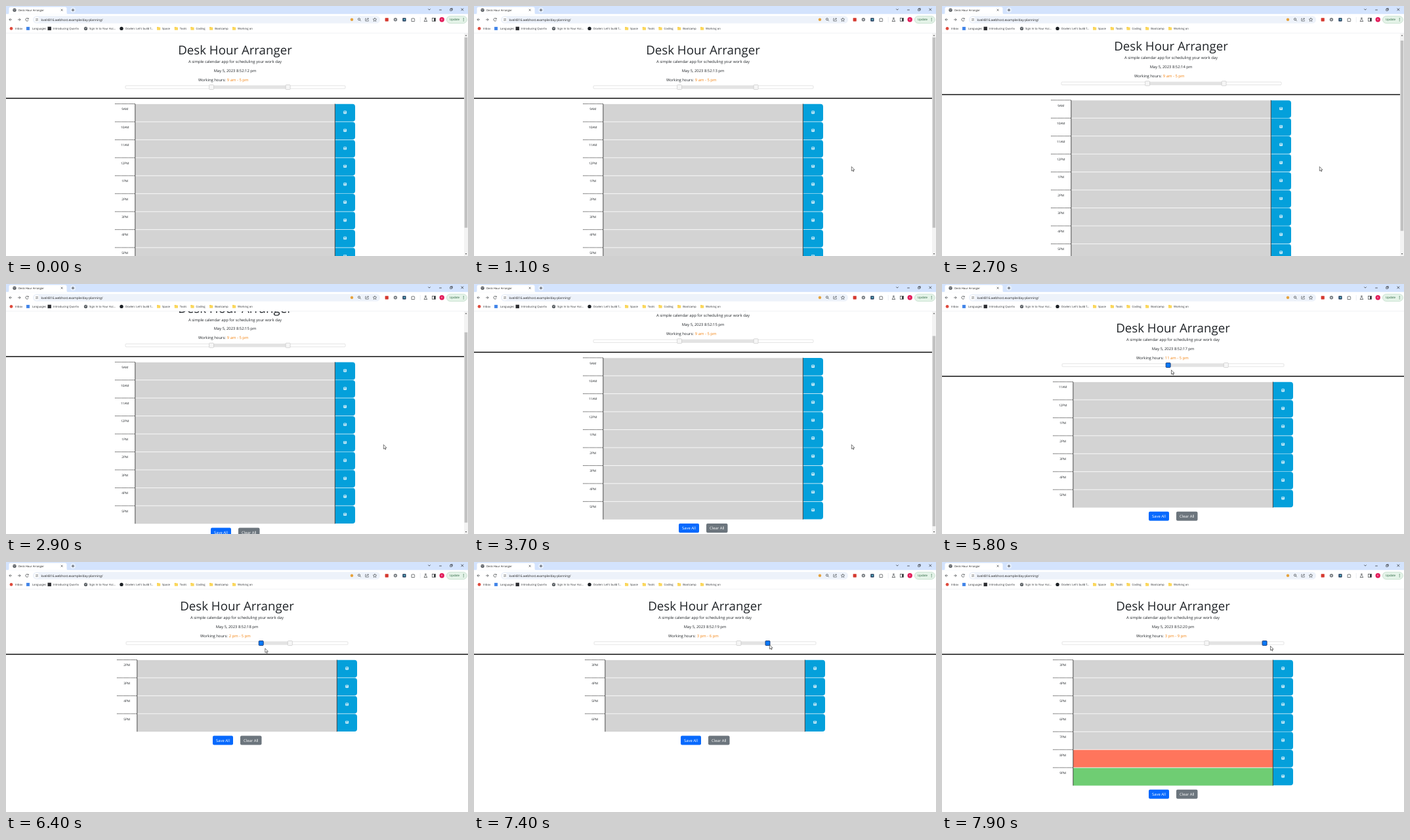
An HTML page that plays this animation: 704 by 382 pixels, repeating every 8 s.

```html
<!DOCTYPE html>
<html lang="en">
<head>
<meta charset="utf-8">
<title>Desk Hour Arranger</title>
<style>
  html, body { margin: 0; width: 100%; height: 100%; overflow: hidden; background: #fff; }
  svg { display: block; width: 100vw; height: 100vh; }
  text { font-family: "Open Sans", "Noto Sans", sans-serif; text-rendering: geometricPrecision; white-space: pre; }
</style>
</head>
<body>
<svg viewBox="0 0 704 382">
  <defs><clipPath id="view"><rect y="41.5" width="704" height="341"/></clipPath></defs>
  <g clip-path="url(#view)"><g id="page"></g></g>
  <g id="scrollbar"></g>
  <g id="browser"></g>
  <path id="cursor" d="M0 0V6.6L1.6 5.2L2.6 7.5L3.6 7L2.6 4.8H4.6Z" fill="#fff" stroke="#222" stroke-width=".6"/>
</svg>
<script>
const $ = id => document.getElementById(id);
const INK = '#212529', UI = '#3c4043';
const TITLE = 'Desk Hour Arranger';
const LOOP = 8000, STEP = 100, MAX_SCROLL = 42.4;

const rect = (x, y, w, h, fill, more = '') =>
  `<rect x="${x}" y="${y}" width="${w}" height="${h}" fill="${fill}" ${more}/>`;
const circle = (x, y, r, fill, more = '') =>
  `<circle cx="${x}" cy="${y}" r="${r}" fill="${fill}" ${more}/>`;
const line = (d, stroke = UI, width = .7, more = '') =>
  `<path d="${d}" fill="none" stroke="${stroke}" stroke-width="${width}" ${more}/>`;
const text = (x, y, str, size, fill = INK, anchor = 'start') =>
  `<text x="${x}" y="${y}" font-size="${size}" fill="${fill}" text-anchor="${anchor}">${str}</text>`;
const move = (id, x, y) => $(id).setAttribute('transform', `matrix(1 0 0 1 ${x} ${y})`);
const globe = (x, y) => circle(x, y, 2.6, '#50555a') +
  line(`M${x - 1.7} ${y - .8}l1.5 .6l.2 1.4M${x + .4} ${y - 1.7}l1.2 1.6`, '#fff', .6);
const folder = (x, y) =>
  rect(x - 2.6, y - 2.4, 2.6, 2, '#f5c842') + rect(x - 2.6, y - 1.8, 5.2, 4.2, '#fbd75b', 'rx=".5"');

function browser() {
  const tabs = rect(0, 0, 704, 12.5, '#d3e3fd') +
    '<path d="M2 12.5Q4.5 12.5 4.5 10V4Q4.5 1.5 7 1.5H90Q92.5 1.5 92.5 4V10Q92.5 12.5 95 12.5Z" fill="#fff"/>' +
    globe(13, 6.2) + text(19, 7.8, TITLE, 4.2, '#1f1f1f') +
    line('M83.7 4.8l2.8 2.8m0-2.8l-2.8 2.8') +
    circle(102, 6.2, 4.4, '#e3edfd') + line('M99.8 6.2h4.4M102 4v4.4', '#222') +
    line('M643.3 4.4l1.7 1.7l1.7-1.7M660.2 6h3.6M693.5 3.6l3.6 3.6m0-3.6l-3.6 3.6', '#222') +
    line('M676.7 4.6h2.6v2.6h-2.6zM677.7 4.6v-1h2.6v2.6h-1', '#222', .6);

  const toolbar = rect(0, 12.5, 704, 29, '#fff') +
    line('M9 20.8H5M6.9 18.8l-2 2l2 2M18 20.8h4M20.1 18.8l2 2l-2 2') +
    line('M33.9 19.6A2.2 2.2 0 1 0 34.1 21.6M34.2 18.2v1.7h-1.7') +
    rect(41, 15.2, 529, 11.4, '#edf2fa', 'rx="5.7"') +
    circle(47, 20.9, 3.8, '#fff') +
    line('M45 19.8h2.2M48.4 19.8h.8M45 22h.8M47 22h2.2', UI, .6) +
    circle(47.8, 19.8, .6, UI) + circle(46.3, 22, .6, UI) +
    text(53.5, 22.7, 'kvel4816.webhost.example/day-planning/', 4.85, '#1f1f1f') +
    circle(527, 20.8, 2.2, '#e6a23c') +
    circle(538, 20.2, 1.6, 'none', `stroke="${UI}" stroke-width=".7"`) + line('M539.2 21.4l1.6 1.7') +
    line('M549 19h-1.2v4h4.6v-1.4M549.3 21.6q.3-2.2 2.8-2.2M551 18l1.6 1.4l-1.6 1.4', UI, .6) +
    line('M562 18l.8 1.9l2 .2l-1.5 1.3l.5 2l-1.8-1l-1.8 1l.5-2l-1.5-1.3l2-.2z', UI, .6) +
    rect(577.6, 18.2, 5.2, 5.2, '#d5392f', 'rx=".6"') +
    circle(593.4, 20.8, 2.7, '#777c80') + circle(593.4, 20.8, 1.1, '#d8dadd') +
    rect(604.3, 18.2, 5.2, 5.2, '#213a5c', 'rx=".6"') + circle(607, 20.8, 1.3, '#5bb9c8') +
    line('M618 19.2h1.5q.4-1.6 1.4 0h1.4v1.5q1.6.5 0 1.5v1.4H618z') +
    line('M631.2 17v8', '#d4dbe6', .5) +
    line('M638.3 18.2h2.2M638.8 18.2v2l-1.7 3.3h4.6l-1.7-3.3v-2', UI, .7) +
    rect(649.6, 18.6, 4.8, 4.6, 'none', `stroke="${UI}" stroke-width=".7"`) + rect(652, 18.6, 2.4, 4.6, UI) +
    circle(664.2, 20.8, 3.7, '#e21b5a') + text(664.2, 22.2, 'K', 3.8, '#fff', 'middle') +
    rect(671.4, 15.4, 31, 11, '#e4f3e8', 'rx="5.5" stroke="#a9cdb4" stroke-width=".5"') +
    text(676, 22.4, 'Update', 4.4, '#1d5b35') +
    [18.9, 20.8, 22.7].map(y => circle(697.2, y, .55, '#1d5b35')).join('');

  const marks = [
    [8, 14, 'Inbox', (x, y) => circle(x, y, 2.4, '#de4a3c')],
    [33.5, 39.8, 'Languages', (x, y) => rect(x - 2.5, y - 2.5, 5, 5, '#4285e8')],
    [66.2, 72, 'Introducing Quorlix', (x, y) => rect(x - 2.7, y - 2.7, 5.4, 5.4, '#2b2c30')],
    [121.5, 127, 'Sign In to Your Acc...', globe],
    [176, 182, "Dovlen: Let's build f...", (x, y) => circle(x, y, 2.7, '#1b1f23')],
    [232.6, 238, 'Space', folder], [259.4, 264.8, 'Tools', folder],
    [284, 289.6, 'Coding', folder], [312.7, 318.2, 'Bootcamp', folder],
    [347.6, 353, 'Working on', folder]
  ].map(([x, tx, label, icon]) => icon(x, 34.4) + text(tx, 36, label, 4.3, '#2b2d30')).join('');

  return tabs + toolbar + marks + line('M0 41.4H704', '#e1e5ea', .5);
}

const clockHour = h => `${h % 12 || 12} ${h < 12 ? 'am' : 'pm'}`;
const slotColor = h => h < 20 ? '#d3d3d3' : h === 20 ? '#ff755c' : '#6fcd73';

function handle(x, active) {
  const [fill, stroke] = active ? ['#0a78f5', '#0a2a66'] : ['#f6f6f6', '#c0c0c0'];
  return rect(x - 3.5, 120.5, 7, 7, fill, `rx="1" stroke="${stroke}" stroke-width="${active ? .8 : .6}"`);
}

function slot(x, y, hour) {
  const label = `${hour % 12 || 12}${hour < 12 ? 'AM' : 'PM'}`;
  const ix = x + 350.6, iy = y + 13;
  return rect(x + 31, y, 304.5, 27.45, slotColor(hour)) +
    line(`M${x + 31} ${y}h304`, '#fff', .8) +
    line(`M${x} ${y}h31`, '#111', .7, 'stroke-dasharray="1.5 .7"') +
    text(x + 15.2, y + 9.8, label, 4.75, INK, 'middle') +
    `<path d="M${x + 335.5} ${y + .3}h26.5q4 0 4 4v18.8q0 4-4 4h-26.5z" fill="#04a0db"/>` +
    rect(ix - 2.2, iy - 2.2, 4.4, 4.4, '#fff', 'rx=".7"') +
    rect(ix - 1.4, iy - 1.5, 2.6, 1.2, '#04a0db') + circle(ix, iy + .9, .7, '#04a0db');
}

function button(x, y, w, label, fill) {
  return rect(x, y, w, 14, fill, 'rx="2"') + text(x + w / 2, y + 9.1, label, 5.9, '#fff', 'middle');
}

function page({ from, to, active, second, barred }) {
  const cx = barred ? 349 : 352, width = cx * 2;
  const left = barred ? 182 : 183, span = barred ? 335 : 338;
  const at = h => left + h * span / 23;
  const x = cx - 183, top = 149.5;
  const bottom = top + (to - from + 1) * 27.45;
  let out = text(cx, 73.8, TITLE, 18.7, INK, 'middle') +
    text(cx, 87, 'A simple calendar app for scheduling your work day', 5.9, INK, 'middle') +
    text(cx, 100.7, `May 5, 2023 8:52:${second} pm`, 5.87, INK, 'middle') +
    text(cx - 56, 114.6, 'Working hours:', 5.9) +
    text(cx - 12.2, 114.6, `${clockHour(from)} - ${clockHour(to)}`, 5.9, '#f3820f') +
    rect(left, 121.8, span, 4.4, '#fff', 'rx="1" stroke="#c9c9c9" stroke-width=".5"') +
    rect(at(from), 121.8, at(to) - at(from), 4.4, '#e3e3e3') +
    handle(at(from), active === 'from') + handle(at(to), active === 'to') +
    rect(0, 140.3, width, 1.5, '#111');
  for (let h = from; h <= to; h++) out += slot(x, top + (h - from) * 27.45, h);
  out += line(`M${x + 30.8} ${top}V${bottom}M${x + 335.3} ${top}V${bottom}`, '#222', .8);
  return out + button(cx - 37, bottom + 6.2, 31, 'Save All', '#0769fd') +
    button(cx + 5, bottom + 6.2, 32.5, 'Clear All', '#6c757d');
}

function scrollbar(overflow, top) {
  const thumb = 327 * 340 / (340 + overflow);
  const y = 48 + (327 - thumb) * top / overflow;
  return rect(698, 41.5, 6, 340.5, '#f3f3f3') + rect(698.7, y, 4.5, thumb, '#c1c1c1') +
    '<path d="M699.6 45.8h2.8l-1.4-1.8zM699.6 378h2.8l-1.4 1.8z" fill="#555"/>';
}

// Pointer path: time, x, y
const path = [
  [700, 690, 365], [1100, 575.3, 245.5], [4000, 575.3, 245.5], [4100, 573.5, 243.5],
  [4400, 352, 147], [4500, 345, 143], [4900, 312.6, 125], [5300, 312.6, 125],
  [5400, 321, 126], [5600, 333, 129.5], [5800, 349.5, 131.5], [6200, 384, 132],
  [6400, 394.8, 132], [6600, 402, 132], [6800, 405, 131], [7100, 436, 126],
  [7300, 438, 126], [7800, 500.5, 128.5], [8000, 500.5, 128.5]
];

function pointer(t) {
  const i = path.findIndex(p => p[0] > t);
  const [t0, x0, y0] = path[i - 1], [t1, x1, y1] = path[i];
  const u = (t - t0) / (t1 - t0);
  return [x0 + (x1 - x0) * u, y0 + (y1 - y0) * u];
}

function ease(start, t) {
  const u = Math.min(1, Math.max(0, (t - start) / 480));
  return u * u * (3 - 2 * u);
}

const hourAt = x => Math.round((x - 183) / 14.7);

function draw(t) {
  const shown = t >= 700;
  const [x, y] = shown ? pointer(t) : [0, 0];
  const from = t < 5400 ? 9 : t < 6800 ? hourAt(x) : 15;
  const to = t < 7200 ? 17 : hourAt(x - 4);
  const active = t >= 7200 ? 'to' : t >= 5200 && t < 6800 ? 'from' : '';
  const second = 12 + Math.floor((t + 100) / 1000);
  const overflow = MAX_SCROLL + (to - from - 8) * 27.45;
  const barred = overflow > 0;
  const top = MAX_SCROLL * (ease(2590, t) - ease(3590, t));

  $('page').innerHTML = page({ from, to, active, second, barred });
  move('page', 0, -top);
  $('scrollbar').innerHTML = barred ? scrollbar(overflow, top) : '';
  $('cursor').setAttribute('visibility', shown ? 'visible' : 'hidden');
  move('cursor', x, y);
}

$('browser').innerHTML = browser();
const start = performance.now();
let last = -1;
function tick() {
  const t = Math.floor((performance.now() - start) % LOOP / STEP) * STEP;
  if (t !== last) draw(last = t);
  requestAnimationFrame(tick);
}
tick();
</script>
</body>
</html>
```
